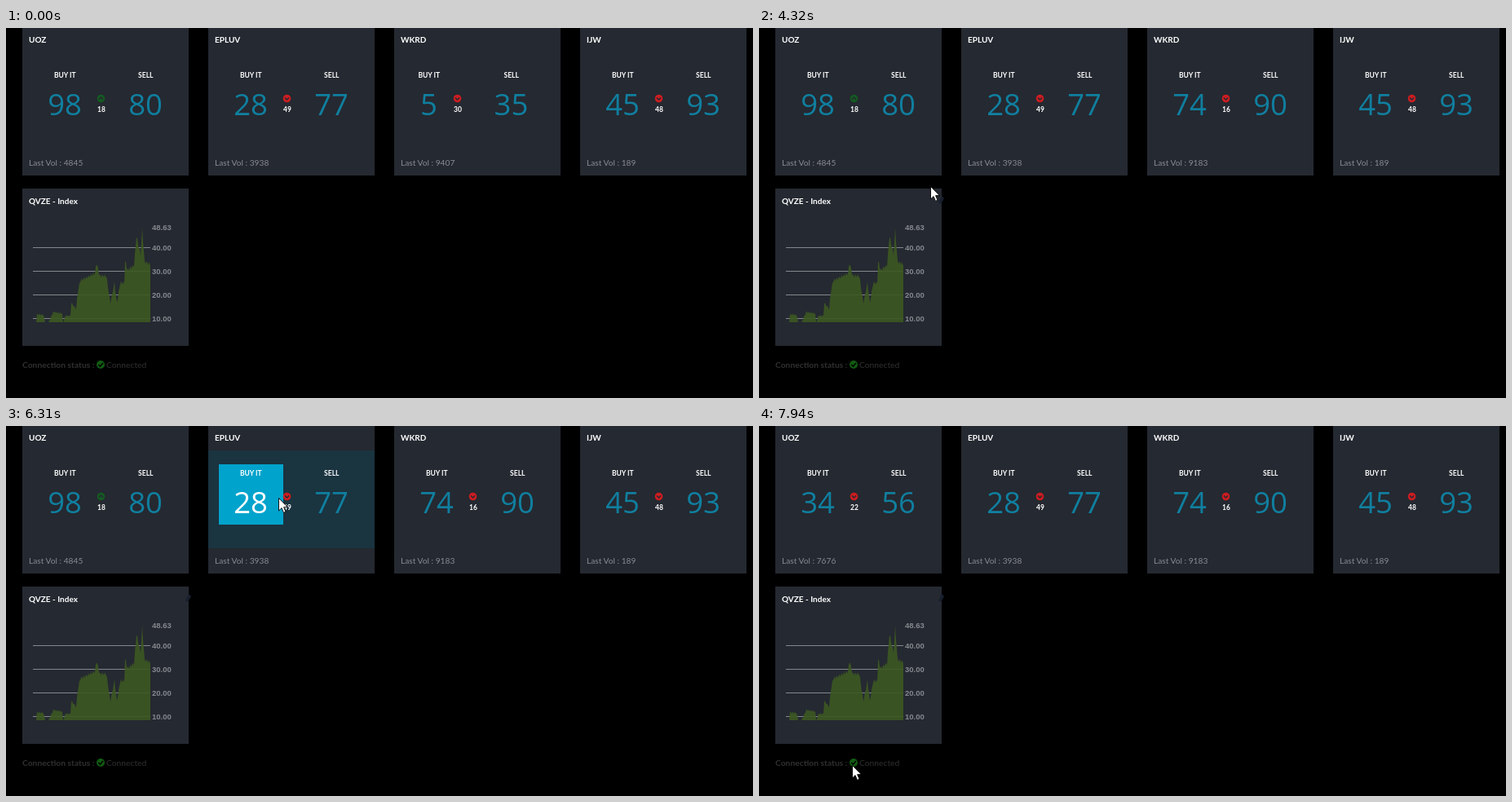
These frames come from a looping animation (916x454 px, 8 s). An HTML page:

```html
<!DOCTYPE html>
<html lang="en">
<head>
<meta charset="utf-8">
<title>Quote board</title>
<style>
html, body { margin: 0; width: 100%; height: 100%; overflow: hidden; background: #000; }
svg { display: block; width: 916px; height: 454px; }
text { font-family: Lato, sans-serif; white-space: pre; }
.title { font-size: 10px; font-weight: 700; fill: #fff; }
.label { font-size: 8.5px; font-weight: 700; fill: #fff; text-anchor: middle; }
.price { font-family: "Open Sans", sans-serif; font-size: 36.5px; fill: #107f9f; text-anchor: middle; }
.price.on { fill: #fff; }
.vol { font-size: 10.2px; fill: #888b93; }
.axis { font: 700 9.5px "Liberation Sans", Arial, sans-serif; fill: #85888e; }
.tip { font: 10px "Liberation Sans", Arial, sans-serif; letter-spacing: .3px; fill: #16161c; }
.b { font-weight: 700; }
.status { font-size: 10.3px; fill: #303030; }
</style>
</head>
<body>
<svg id="stage" viewBox="0 0 916 454"></svg>
<script>
const LOOP = 8000, STEP = 76;
const stage = document.getElementById('stage');
const CARD = '#252931', HOVER = '#1a3440', ACCENT = '#00a3cc', UP = '#155a22', DOWN = '#cc1d21';
const INDEX = 'QVZE';

function add(parent, tag, attrs = {}, text) {
  const el = document.createElementNS('http://www.w3.org/2000/svg', tag);
  set(el, attrs);
  if (text !== undefined) el.textContent = text;
  parent.append(el);
  return el;
}
function set(el, attrs) {
  for (const k in attrs) el.setAttribute(k, attrs[k]);
}
const show = (el, on) => el.setAttribute('visibility', on ? 'visible' : 'hidden');
const rect = (p, x, y, width, height, fill) => add(p, 'rect', { x, y, width, height, fill });
const text = (p, x, y, cls, s) => add(p, 'text', { x, y, class: cls }, s);
const inside = (p, x, y, w, h) => p && p.x >= x && p.x < x + w && p.y >= y && p.y < y + h;
const mix = (a, b, k) => a + (b - a) * k;

// each quote: start ms, buy, sell, volume
const stocks = [
  { name: 'UOZ', quotes: [[0, 98, 80, 4845], [6390, 34, 56, 7676]] },
  { name: 'EPLUV', quotes: [[0, 28, 77, 3938]] },
  { name: 'WKRD', quotes: [[0, 5, 35, 9407], [500, 82, 39, 7763], [3460, 74, 90, 9183]] },
  { name: 'IJW', quotes: [[0, 45, 93, 189]] }
];

// pointer moves: first ms, number of steps, goal x, y, sag of the path
const ENTRY = { x: 660, y: 285 };
const moves = [
  [3920, 3, 215, 198, 0],
  [4320, 5, 86, 98, 0],
  [4840, 2, 151, 90, 12],
  [5620, 3, 326, 87, 5],
  [6310, 3, 390, 86, 4],
  [6940, 4, 147, 279, 0],
  [7244, 5, 115, 417, 0]
];
const ease = p => p < .5 ? 4 * p ** 3 : 1 - 4 * (1 - p) ** 3;

function pointerAt(t) {
  if (t < moves[0][0]) return null;
  let { x, y } = ENTRY;
  for (const [first, steps, goalX, goalY, sag] of moves) {
    if (t < first) break;
    const p = ease(Math.min(1, (Math.floor((t - first) / STEP) + 1) / steps));
    x = mix(x, goalX, p);
    y = mix(y, goalY, p) + sag * Math.sin(Math.PI * p);
  }
  return { x: Math.round(x), y: Math.round(y) };
}

// chart: key points [x, value], joined by lines with a small ripple
const LEFT = 33, RIGHT = 177, FLOOR = 8.26;
const keys = [
  [33, 8], [37, 8], [38, 11.6], [46, 11.4], [48, 8], [52, 8], [58, 12.6], [69, 12], [70, 8],
  [73, 11], [79, 11], [80, 16.5], [86, 14], [88, 21], [91, 26], [109, 29], [111, 33.5], [115, 28],
  [123, 28], [128, 16.5], [133, 25], [136, 16.5], [140, 25], [145, 25], [146, 34.5], [149, 30.42],
  [157, 32.5], [160, 45], [165, 37], [167, 48], [170, 34], [177, 33]
];
function valueAt(x) {
  const i = Math.max(1, keys.findIndex(k => k[0] >= x));
  const [[x0, v0], [x1, v1]] = [keys[i - 1], keys[i]];
  const v = mix(v0, v1, (x - x0) / (x1 - x0));
  return Math.max(FLOOR, v + .8 * Math.sin((x - 149) * 2.2) * Math.min(1, v / 25));
}
const yOf = v => 356 - (v - 10) * 2.88;

function areaPath() {
  let d = `M${LEFT} 361`;
  for (let x = LEFT; x <= RIGHT; x++) d += `L${x} ${yOf(valueAt(x)).toFixed(1)}`;
  return d + 'V361Z';
}

function stockCard({ name }, i) {
  const g = add(stage, 'g', { transform: `translate(${20 + 228 * i})` });
  rect(g, 0, 0, 204, 181, CARD);
  const hover = rect(g, 0, 30, 204, 120, HOVER);
  text(g, 8, 18, 'title', name);
  const half = (left, label) => ({
    left,
    tile: rect(g, left, 47, 79, 74, ACCENT),
    label: text(g, 0, 61, 'label', label),
    price: text(g, 0, 106.5, 'price')
  });
  const buy = half(13, 'BUY IT'), sell = half(112, 'SELL');
  const icon = add(g, 'g');
  const disc = add(icon, 'circle', { r: 4.8 });
  const mark = add(icon, 'path', { d: 'M-2.5 -1 0 1.5 2.5 -1', fill: 'none', stroke: CARD, 'stroke-width': 1.5 });
  const diff = text(g, 0, 103, 'label');
  const vol = text(g, 8, 169, 'vol');
  return { hover, buy, sell, icon, disc, mark, diff, vol };
}
const cards = stocks.map(stockCard);

// index card
rect(stage, 20, 197, 204, 193, CARD);
const indexHover = rect(stage, 20, 228, 204, 162, HOVER);
text(stage, 28, 216, 'title', INDEX + ' - Index');
const axisLabel = v => text(stage, 179, yOf(v) + 3.5, 'axis', v.toFixed(2));
axisLabel(48.63);
for (let v = 40; v >= 10; v -= 10) {
  rect(stage, LEFT, Math.floor(yOf(v)), RIGHT - LEFT, 1, '#84878d');
  axisLabel(v);
}
const area = add(stage, 'path', { d: areaPath(), 'fill-opacity': .9 });
const pencil = add(stage, 'path', { d: 'M220 214 224 206 227 209 223 216Z', fill: '#181f2e' });
const cross = rect(stage, 0, 245, 1, 116, '#5b6c72');

// chart tooltip
const tip = add(stage, 'g');
add(tip, 'rect', { width: 100, height: 38, rx: 3, fill: '#cfd0d1' });
const tipDate = text(tip, 7, 17, 'tip b');
add(tip, 'rect', { x: 7.5, y: 21.5, width: 8, height: 8, fill: '#69a032', stroke: '#6d7a62' });
text(tip, 25, 30, 'tip', INDEX);
const tipValue = text(tip, 60, 30, 'tip b');

// connection line
text(stage, 20, 417, 'status b', 'Connection status :');
add(stage, 'circle', { cx: 116, cy: 413, r: 5, fill: '#125a12' });
add(stage, 'path', { d: 'M113.2 413 115.4 415.2 119 411', fill: 'none', stroke: '#000', 'stroke-width': 1.5 });
text(stage, 123, 417, 'status', 'Connected');

const arrow = add(stage, 'path', {
  d: 'M-.5 -.5V15L3 11.6 5.5 17.4 8 16.3 5.6 10.6H10.4Z', fill: '#fff', stroke: '#000', 'stroke-width': .9
});

function drawHalf(half, center, price, lit) {
  half.label.setAttribute('x', center + .3);
  half.price.setAttribute('x', center);
  half.price.textContent = price;
  half.price.classList.toggle('on', lit);
  show(half.tile, lit);
}

function drawCard(c, i, t, pointer) {
  const left = 20 + 228 * i;
  const [, buy, sell, vol] = stocks[i].quotes.filter(q => q[0] <= t).pop();
  const lit = half => Boolean(inside(pointer, left + half.left, 47, 79, 74));
  const shift = buy < 10 ? 9.5 : 0; // a single digit narrows the row
  const mid = 96.5 - 2 * shift;
  drawHalf(c.buy, 52 - shift, buy, lit(c.buy));
  drawHalf(c.sell, 151 - .8 * shift, sell, lit(c.sell));
  c.diff.textContent = Math.abs(buy - sell);
  c.diff.setAttribute('x', mid + .5);
  c.vol.textContent = 'Last Vol : ' + vol;
  set(c.icon, { transform: `translate(${mid} 86.5)` });
  set(c.disc, { fill: buy > sell ? UP : DOWN });
  set(c.mark, { transform: `scale(1 ${buy > sell ? -1 : 1})` });
  show(c.hover, inside(pointer, left, 30, 204, 120));
}

function drawIndex(pointer) {
  const over = inside(pointer, 20, 228, 204, 162);
  const onPlot = inside(pointer, LEFT, 245, RIGHT - LEFT, 116);
  show(indexHover, over);
  set(area, { fill: over ? '#335f2a' : '#3c5822' });
  show(cross, onPlot);
  show(tip, onPlot);
  if (!onPlot) return;
  // one point per month, 4px apart
  const month = Math.round((pointer.x - LEFT) / 4);
  const x = LEFT + month * 4;
  const [year, mm, dd] = new Date(Date.UTC(2010, month - 24, 0)).toISOString().slice(0, 10).split('-');
  set(cross, { x: x - .5 });
  set(tip, { transform: `translate(${x + 20} ${pointer.y - 28})` });
  tipDate.textContent = `${mm}/${dd}/${year}`;
  tipValue.textContent = valueAt(x).toFixed(2);
}

function render(t) {
  const pointer = pointerAt(t);
  cards.forEach((c, i) => drawCard(c, i, t, pointer));
  drawIndex(pointer);
  show(pencil, t >= moves[0][0] + 2 * STEP);
  show(arrow, pointer);
  if (pointer) set(arrow, { transform: `translate(${pointer.x} ${pointer.y})` });
}

const start = performance.now();
function tick() {
  render((performance.now() - start) % LOOP);
  requestAnimationFrame(tick);
}
tick();
</script>
</body>
</html>
```
